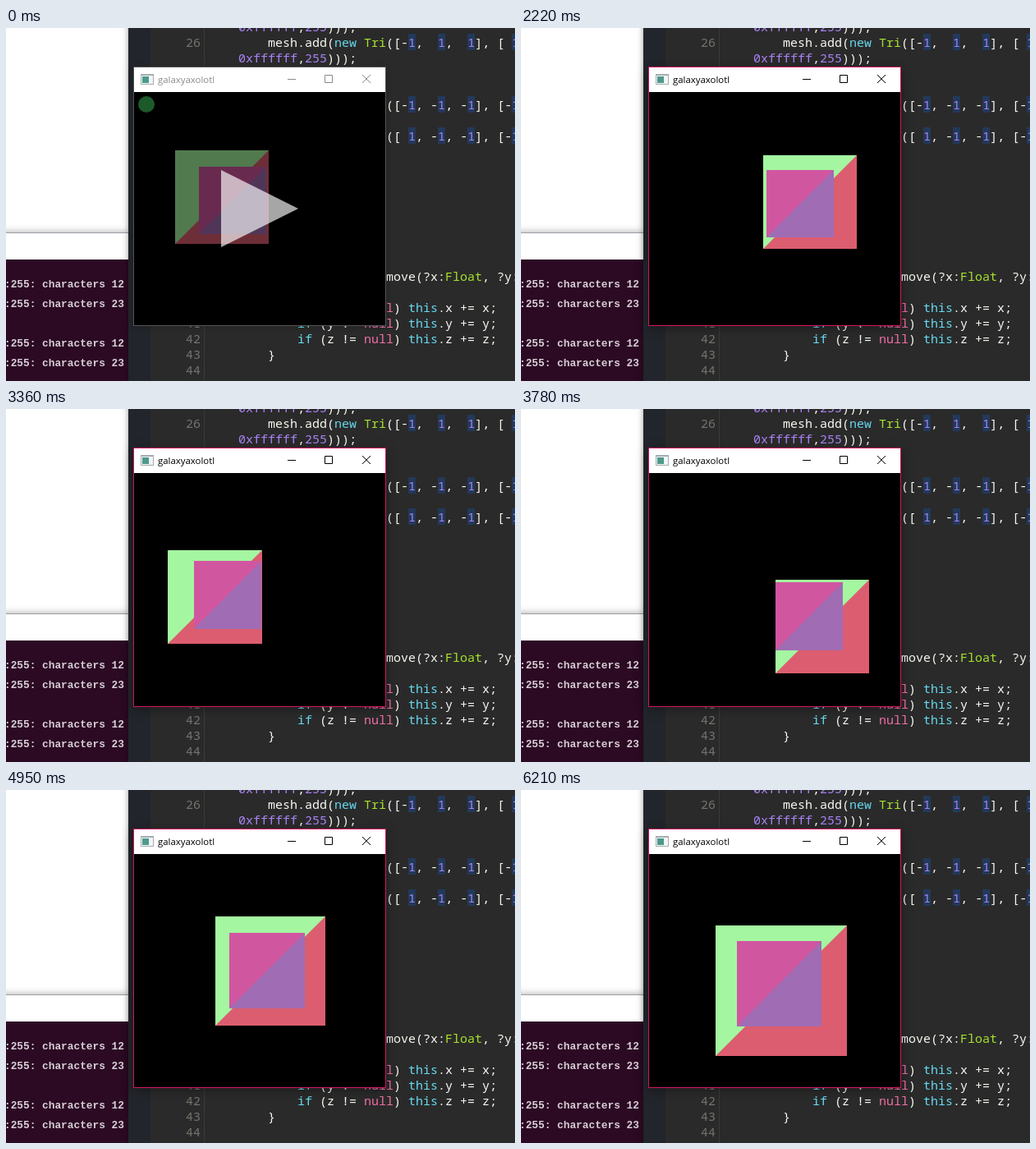
These frames come from a looping animation (620 px wide and 430 px high, 6.24 s). An HTML page with a canvas:

```html
<!DOCTYPE html>
<html lang="en">
<head>
<meta charset="utf-8">
<title>Cube demo</title>
<style>
html, body { margin: 0; width: 100%; height: 100%; overflow: hidden; background: #2a2a2a; }
#stage { position: relative; width: 620px; height: 430px; overflow: hidden; background: #fff; }
#stage div, #stage pre, #stage canvas, #stage svg { position: absolute; margin: 0; }
#console { left: -20px; top: 249px; width: 170px; height: 200px; background: #fff;
  border-top: 1px solid #9d9da6; box-shadow: 0 0 9px rgba(0,0,0,.35); }
#term { left: 0; top: 282px; width: 150px; height: 148px; background: #2c0a24; overflow: hidden; }
#term pre { left: -2px; top: 19px; font: bold 12.8px/24px "Liberation Mono", monospace; color: #d8d0d6; }
#editor { left: 150px; top: -20px; width: 490px; height: 470px; background: #2a2a2a;
  box-shadow: 0 0 8px rgba(0,0,0,.5); }
#side { left: 149px; top: 0; width: 27px; height: 430px; background: #22252b; }
#rule { left: 241px; top: 0; width: 1px; height: 430px; background: #3a3a3a; }
#code, #gutter { font: 15px/19px "Noto Sans Mono", monospace; }
#code { left: 283px; top: -11px; color: #f8f8f2; }
#gutter { left: 219px; top: 8px; color: #74746e; }
.num { color: #a982f5; }
.box { color: #a982f5; background: #22395a; }
.null { color: #f06fa6; }
.type { color: #a6e22e; }
.word { color: #66d9ef; }
#win { left: 155px; top: 47px; width: 306px; height: 314px; border: 1px solid #555;
  background: #fff; color: #8a8a8a; box-shadow: 0 1px 8px rgba(0,0,0,.22); }
#win.active { border-color: #cf1760; color: #000; box-shadow: 0 3px 13px rgba(0,0,0,.34); }
#title { left: 29px; top: 6px; font: 11.4px/18px "Open Sans", sans-serif; white-space: pre; }
#view { left: 0; top: 30px; }
</style>
</head>
<body>
<div id="stage">
  <div id="console"></div>
  <div id="term"><pre>:255: characters 12
:255: characters 23

:255: characters 12
:255: characters 23</pre></div>
  <div id="editor"></div>
  <div id="side"></div>
  <div id="rule"></div>
  <pre id="gutter"></pre>
  <pre id="code">0xffffff,255)));
    mesh.add(new Tri([-1,  1,  1], [ 1
0xffffff,255)));


    mesh.add(new Tri([-1, -1, -1], [-1

    mesh.add(new Tri([ 1, -1, -1], [-1








    public function move(?x:Float, ?y:

        if (x != null) this.x += x;
        if (y != null) this.y += y;
        if (z != null) this.z += z;
    }</pre>
  <div id="win">
    <svg width="306" height="30" fill="none" stroke="currentColor">
      <g stroke="none">
        <path fill="#a3adb0" d="M8 8h16v13H8z"/>
        <path fill="#f2f5f5" d="M9 10h14v10H9z"/>
        <path fill="#4c9a8c" d="M10 11h8v8h-8z"/>
      </g>
      <path d="M187 14.5h10M232.500 9.500h9v9h-9zM278 9l10 10M288 9l-10 10"/>
    </svg>
    <div id="title">galaxyaxolotl</div>
    <canvas id="view" width="306" height="284"></canvas>
  </div>
</div>
<script>
const LOOP = 6240, STEP = 30;
const $ = id => document.getElementById(id);

const classes = { new: 'word', if: 'word', this: 'word', null: 'null', Tri: 'type', Float: 'type', 1: 'box' };
$('code').innerHTML = $('code').textContent.replace(/\b(0x\w+|\d+|new|null|this|Tri|Float|if)\b/g,
  word => `<span class="${classes[word] || 'num'}">${word}</span>`);
$('gutter').textContent = 26 + '\n'.repeat(18) + [41, 42, 43, 44].join('\n');

// Turning points of the cube; a key without a place holds the one before
const keys = [
  { t: 0, x: -46, y: -14, k: 1 },
  { t: 450 },
  { t: 900, x: -33, y: 27 },
  { t: 1140, x: 0, y: 37.3 },
  { t: 1710, x: 58, y: 15 },
  { t: 1920, y: -8 },
  { t: 2070 },
  { t: 2220, x: 43 },
  { t: 2700, x: -14.5, y: -11 },
  { t: 2940, x: -64, y: -46 },
  { t: 3090, x: -84, y: -29 },
  { t: 3360, x: -54.5, y: 9 },
  { t: 3990, x: 88, y: 52 },
  { t: 4230, x: 51.6, y: 40.5, k: 1.075 },
  { t: 4590, x: 16.3, y: 29.4, k: 1.325 },
  { t: 4950, x: 11.1, y: 0.4, k: 1.167 },
  { t: 5300, x: 8, y: -5, k: 1.75 },
  { t: 5460, x: -37, y: 13.5, k: 1.625 },
  { t: 5730 },
  { t: LOOP - STEP, x: 5.7, y: 17.6, k: 1.394 }
];
keys.forEach((key, i) => { keys[i] = { ...keys[i - 1], ...key }; });

const slope = (i, c) => (keys[i + 1][c] - keys[i][c]) / (keys[i + 1].t - keys[i].t);

// Tangents that never overshoot a key
function tangent(i, c) {
  if (i === 0 || i === keys.length - 1) return 0;
  const a = slope(i - 1, c), b = slope(i, c);
  return a * b > 0 ? 2 * a * b / (a + b) : 0;
}

function pose(t) {
  const next = keys.findIndex(key => key.t > t);
  const i = (next < 0 ? keys.length - 1 : next) - 1;
  const a = keys[i], b = keys[i + 1], span = b.t - a.t;
  const u = (t - a.t) / span, v = 1 - u;
  return ['x', 'y', 'k'].map(c =>
    a[c] * (1 + 2 * u) * v * v + b[c] * (1 + 2 * v) * u * u +
    span * u * v * (tangent(i, c) * v - tangent(i + 1, c) * u));
}

const ctx = $('view').getContext('2d');
const HALF = 57.2, DEPTH = 5.125;

function fill(style, ...pts) {
  ctx.fillStyle = style;
  ctx.beginPath();
  pts.forEach(p => ctx.lineTo(...p));
  ctx.fill();
}

function face(x, y, scale, upper, lower) {
  const [l, r] = [x - HALF, x + HALF].map(v => Math.round(153 + v * scale));
  const [t, b] = [y - HALF, y + HALF].map(v => Math.round(142 + v * scale));
  ctx.fillStyle = upper;
  ctx.fillRect(l, t, r - l, b - t);
  fill(lower, [r, t], [r, b], [l, b]);
}

function pauseScreen() {
  ctx.fillStyle = 'rgba(0,0,0,.5)';
  ctx.fillRect(0, 0, 306, 284);
  fill('rgba(255,255,255,.65)', [106, 95], [106, 189], [200, 142]);
  ctx.fillStyle = '#1c5a2a';
  ctx.beginPath();
  ctx.arc(15, 15, 10, 0, 7);
  ctx.fill();
}

function draw(now) {
  const t = Math.floor((now % LOOP) / STEP) * STEP;
  const [x, y, k] = pose(t);
  $('win').classList.toggle('active', t >= 300);
  ctx.fillStyle = '#000';
  ctx.fillRect(0, 0, 306, 284);
  face(x, y, k, '#a4f6a0', '#dc5d70');
  face(x, y, DEPTH / (DEPTH / k + 2), '#d156a0', '#a06cb4');
  if (t < 330) pauseScreen();
}

const start = performance.now();
function tick() {
  draw(performance.now() - start);
  requestAnimationFrame(tick);
}
tick();
</script>
</body>
</html>
```
